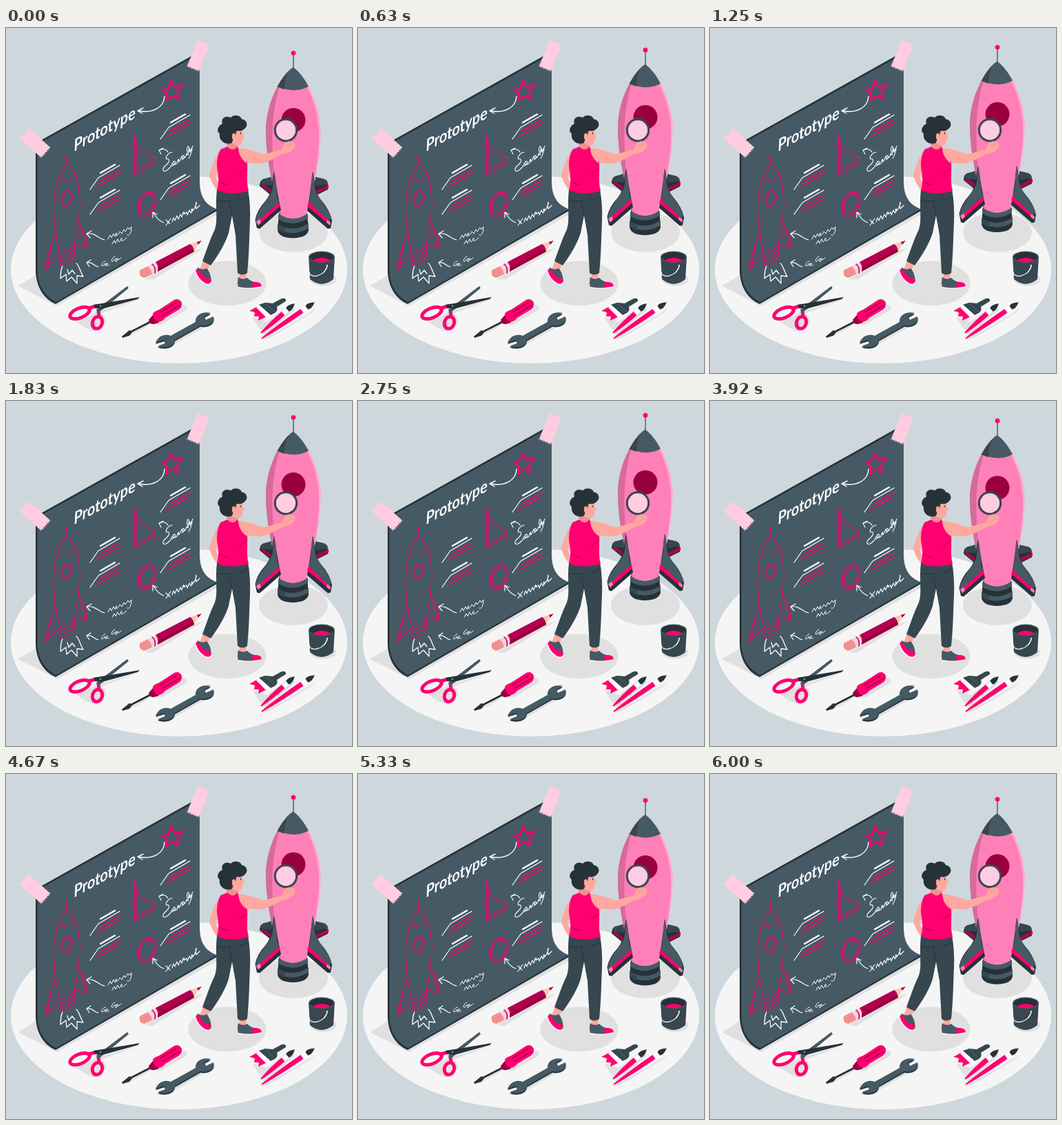
Recreate the animation shown at these times as an HTML page with a canvas. Size 502x500 px, loop 6.04 s.

```html
<!DOCTYPE html>
<html lang="en">
<head>
<meta charset="utf-8">
<title>Prototype</title>
<style>
html, body { margin: 0; width: 100%; height: 100%; overflow: hidden; background: #ced7dc; }
canvas { display: block; width: 502px; height: 500px; }
</style>
</head>
<body>
<canvas id="stage"></canvas>
<script>
const W = 502, H = 500, LOOP = 6040, PEAK = 2520, TRAVEL = 20.5;
const C = {
  sky: '#ced7dc', floor: '#f5f5f5', shade: '#e0e0e0', ink: '#263238', dark: '#37474f',
  slate: '#455a64', pink: '#ff0070', wine: '#99003f', crimson: '#b3004f', rose: '#ff80b8',
  blush: '#ffcce2', skin: '#ffa8a0', skinDark: '#f28f8f', white: '#fff'
};
const canvas = document.getElementById('stage');
const g = canvas.getContext('2d');
const dpr = window.devicePixelRatio || 1;
canvas.width = W * dpr;
canvas.height = H * dpr;

const paths = new Map();
function path(d) {
  if (!paths.has(d)) paths.set(d, new Path2D(d));
  return paths.get(d);
}
function fill(color, d) {
  g.fillStyle = color;
  g.fill(path(d));
}
function line(color, w, d, dash = []) {
  g.strokeStyle = color;
  g.lineWidth = w;
  g.setLineDash(dash);
  g.stroke(path(d));
}
function oval(color, x, y, rx, ry = rx, turn = 0, w = 0, dash = []) {
  g.beginPath();
  g.ellipse(x, y, rx, ry, turn, 0, Math.PI * 2);
  if (w) {
    g.strokeStyle = color;
    g.lineWidth = w;
    g.setLineDash(dash);
    g.stroke();
  } else {
    g.fillStyle = color;
    g.fill();
  }
}
function at(x, y, draw) {
  g.save();
  g.translate(x, y);
  draw();
  g.restore();
}

// Strip of tape with saw-tooth ends, centred on x, y
function tape(x, y, turn, len, wide) {
  at(x, y, () => {
    g.rotate(turn);
    g.beginPath();
    const n = 10;
    for (const side of [1, -1]) {
      for (let i = 0; i <= n; i++) {
        g.lineTo(side * (len / 2 - (i % 2) * 2), side * wide * (i / n - 0.5));
      }
    }
    g.closePath();
    g.fillStyle = C.blush;
    g.fill();
  });
}

function note(x, y) {
  at(x, y, () => {
    line(C.white, 1.2, 'M0 0L12 -17L43 -35');
    line(C.white, 2.4, 'M15 -24L36 -36');
    line(C.pink, 1.5, 'M14 -12L42 -28M10 -4L42 -22');
  });
}

function board() {
  fill(C.shade, 'M17 374L45 357L74 398L305 264L309 269L74 403Z');
  fill(C.ink, 'M43 167L280 34.5V222C280 244 288 256 306 263V265L72 400C53 392 43 372 43 350Z');
  fill(C.slate, 'M45.5 168.5L281 37V222C281 244 289 256 306 262.5L73 397C55 389 45.5 371 45.5 350Z');

  g.save();
  g.transform(0.8, -0.44, -0.06, 1, 98, 179.5);
  g.font = '700 25px Lato, sans-serif';
  g.fillStyle = C.white;
  g.fillText('Prototype', 0, 0);
  g.restore();

  line(C.pink, 2.6, 'M239 76L244 85L256 83L248 92L251 103L242 98L232 106L234 95L227 90L236 87Z');
  line(C.white, 1.4, 'M230 99C229 116 212 124 192 120M199 116L191 120L198 124');
  note(122, 234);
  note(122, 270);
  note(224, 161);
  note(224, 249);
  sketch();
  script();
  tape(42, 166.5, 0.73, 44, 20);
  tape(279, 40, -1.18, 43, 18.5);
}

function sketch() {
  const p = C.pink;
  // small rocket
  oval(p, 87.5, 185.5, 2);
  line(p, 1.1, 'M88 187V197');
  line(p, 1.2, 'M88 197C75 209 69 237 69 262C70 289 74 310 78 326M88 197C102 205 107 230 107 254C106 279 103 298 99 314', [7, 1.2]);
  line(p, 1.1, 'M77 221Q91 224 102 211');
  oval(p, 88, 247, 7.5, 11.5, 0.3, 1.4, [5, 1]);
  oval(p, 88, 247, 5, 8.5, 0.3, 0.9);
  line(p, 1.2, 'M71 296C67 316 60 320 58 350L76 329M65 318L60 347M106 280C108 292 119 295 117 318L100 313M109 290L115 315', [8, 1]);
  line(p, 1.1, 'M77 326Q90 327 100 313M77 331Q91 331 100 319M77 337Q92 337 100 325M79 343Q93 342 99 330M77 326L79 344M100 313L99 331');
  line(C.white, 1.3, 'M82 345C78 353 80 358 79 363L87 357L88 367L95 361L103 370L103 359L112 360C107 353 107 345 102 341M89 350L91 357L96 351L100 356');
  // wing profile
  line(p, 1.3, 'M186.5 155V212M187 156C188 175 197 181 215 187M216 187V196L186 213');
  line(p, 0.9, 'M189.5 164V206M189 205L214 192M188 209L214 195', [3, 1.8]);
  // toothed ring
  oval(p, 204.5, 255, 11.5, 18, 0.4, 2.2, [3, 1.6]);
  oval(p, 204.5, 255, 9, 15, 0.4, 1);
}

function script() {
  const w = C.white;
  line(w, 1.1, 'M235 180C231 174 227 175 223 177M228 174L222 177L225 183');
  line(w, 1.1, 'M241 180C237 180 230 187 233 190C238 188 238 194 232 199C226 204 227 209 232 207C238 204 241 198 241 196M241 200C246 197 247 193 244 193C241 196 242 201 248 196L250 190L251 194L255 186M255 191C259 189 260 184 257 185C254 188 256 192 261 186L262 182L264 184C266 176 266 168 263 173C262 180 264 184 267 175V180L271 171M270 175C269 182 267 186 265 189');
  line(w, 1.2, 'M229 282C222 280 218 275 214 268M213 275L213 267L219 270');
  line(w, 1.1, 'M232 278L238 284M239 276L232 286M241 281L243 275L245 279L248 272L250 277L253 270L255 274C257 266 259 264 258 270L262 267L263 271L266 264L268 268C272 264 271 260 269 263C268 268 273 265 276 255C277 249 274 254 276 262L281 257');
  line(w, 1.2, 'M143 307C135 306 129 296 118 298M124 294L117 298L122 304');
  line(w, 1, 'M148 306L151 300L153 304L156 298L158 302C162 299 161 295 159 298C158 303 163 301 165 295L168 298L171 292L173 295L177 289L179 292L182 288C182 295 180 302 176 300');
  line(w, 1, 'M154 313L157 308L159 312L162 306L164 310C169 307 169 303 167 305C165 310 171 309 175 304');
  line(w, 1.2, 'M134 346C128 346 127 339 118 340M123 336L117 340L121 346');
  line(w, 1, 'M144 338C139 339 137 346 140 345L144 341V345C148 342 148 339 146 341C145 345 148 345 150 343M158 331C153 333 152 340 155 338L159 334V339C163 336 163 332 161 334C160 338 164 336 167 333');
}

// Slim brush from its pointed end, drawn along the x axis
function brush(x, y, turn, len) {
  at(x, y, () => {
    g.rotate(turn);
    const n = len - 22;
    fill(C.pink, `M0 -1Q${n / 2} -4 ${n} -3.5V3.5Q${n / 2} 4 0 1Z`);
    fill(C.white, `M${n} -3.5L${n + 8} -3V3L${n} 3.5Z`);
    fill(C.ink, `M${n + 8} -3Q${n + 13} -6 ${len} 0Q${n + 13} 6 ${n + 8} 3Z`);
  });
}

function tools() {
  // pencil
  fill(C.shade, 'M201 364L279 321L287 319L213 365Z');
  fill('#f28f8f', 'M194 351L206 345L214 356L201 362Q192 361 194 351Z');
  fill(C.blush, 'M206 345L218 339Q224 346 221 352L211 358Q213 351 206 345Z');
  line(C.crimson, 1.6, 'M212 342Q218 347 216 355');
  fill(C.crimson, 'M217 339L267 313L273 315L273 324L220 353Q222 346 217 339Z');
  fill(C.wine, 'M221 347L273 319V324L220 353Z');
  fill('#ffc4b5', 'M267 313L281 309L273 324Q272 316 267 313Z');
  fill(C.wine, 'M277 310.3L284 308L279 314Z');

  // scissors
  fill(C.shade, 'M93 421Q108 427 132 411L192 394L138 414Q151 421 140 434L126 440Z');
  oval(C.pink, 107, 413, 15, 7, -0.38, 5);
  line(C.pink, 5, 'M120 406L131 403');
  oval(C.pink, 132.5, 427, 7, 9, 0.3, 5);
  line(C.pink, 5, 'M135 417L134 410');
  fill(C.slate, 'M131 408L176 374L178 377L140 408L134 413Z');
  fill(C.ink, 'M127 401L140 399L194 390L191 393L140 407L129 406Z');
  oval('#90a4ae', 137, 403, 1.2);

  // screwdriver
  fill(C.shade, 'M174 450L211 429L225 430L261 409Q266 401 256 401L216 419Z');
  line(C.ink, 3, 'M180 441L211 425');
  fill(C.ink, 'M168 447L179 438L184 440L179 446L169 449Z');
  fill(C.wine, 'M207 423L214 415L222 427L215 429Q208 430 207 423Z');
  fill(C.pink, 'M213 415C214 410 220 410 224 407L244 394Q251 391 255 398Q256 404 251 408L231 420Q229 424 222 426Q213 424 213 415Z');
  line(C.wine, 1.3, 'M224 412L247 398M226 417L252 402');

  // wrench
  fill(C.shade, 'M223 466L247 457L285 435L302 428L303 421L283 429L240 453Z');
  const wrench = 'M217 456C222 445 231 443 239 446L275 426C274 416 285 410 297 413L288 418L290 423L301 418C304 427 294 433 282 431L245 452C245 462 230 465 220 461L231 457L230 452Z';
  at(0, 2, () => fill(C.ink, wrench));
  fill(C.slate, wrench);

  // brushes
  fill(C.shade, 'M357 419L379 426L410 402L419 408L378 443L374 450L412 430L449 407L443 413L399 440L378 451Z');
  fill(C.pink, 'M353 410L364 404L379 418L366 424L367 418L360 418L361 412Z');
  fill(C.white, 'M363 405L368 401L384 415L377 419Z');
  fill(C.dark, 'M367 401L376 398L387 399L400 392Q407 391 406 396L393 404Q395 410 390 413L384 416Z');
  line(C.slate, 1.3, 'M376 399L390 412');
  brush(370, 442, -0.72, 65);
  brush(371, 450, -0.6, 93);

  // bucket
  oval(C.shade, 460, 364, 19, 10);
  fill(C.dark, 'M439 331L441 364Q458 378 475 364L477 331Z');
  oval(C.slate, 458, 332, 19, 8.5);
  oval(C.ink, 458, 332, 17.3, 7.2);
  fill(C.pink, 'M445 337Q458 329 471 337Q458 342 445 337Z');
  line(C.white, 1.3, 'M440 354C441 364 463 360 466 345');
  oval(C.white, 466, 344, 1.1);
}

function rocket() {
  // rear fins
  fill(C.ink, 'M389 215L373 219Q368 222 368 229L385 243Z');
  fill(C.dark, 'M369 222L386 215V228L371 227Z');
  fill(C.crimson, 'M369 228L374 227L387 237V242Z');
  fill(C.ink, 'M445 215L462 219Q468 223 467 234L447 244Z');
  fill(C.dark, 'M449 216L462 219Q467 221 467 226L449 229Z');
  fill(C.crimson, 'M447 237L468 227V232L447 242Z');

  // engine
  fill(C.ink, 'M396 268L394 293Q396 304 416 304.5Q437 304 439 293L437 268Z');
  fill(C.slate, 'M395 271V277Q416 290 438 276V270Z');
  fill(C.slate, 'M394 284Q416 298 439 283V290Q416 304 394 291Z');
  fill(C.dark, 'M394 284Q399 288 405 290V297Q398 295 394 291Z');

  // hull
  const hull = 'M416.5 57C403 65 379 101 377 145C376 188 388 230 397 270Q416 283 436 270C447 230 457 190 456.5 145C454 101 430 65 416.5 57Z';
  g.save();
  g.clip(path(hull));
  fill(C.rose, hull);
  fill('#d66b9b', 'M400 75C387 112 385 151 387 180C388 218 394 248 401 280H360V75Z');
  fill('#ffacd1', 'M436 84C451 111 455 140 454 164C452 207 443 244 434 277H465V84Z');
  fill(C.slate, 'M390 50H442V83Q418 98 390 82Z');
  fill(C.dark, 'M390 50H417C408 62 404 76 404 89L390 84Z');
  g.restore();
  oval(C.wine, 417, 133.5, 17.5);
  line(C.slate, 1.4, 'M417 58V39');
  oval(C.pink, 417, 36.3, 3.4);

  // front fins
  fill(C.ink, 'M389 208C385 222 388 236 377 250Q364 264 361.5 278L364 290L368 291L399 264Q394 242 389 208Z');
  fill(C.slate, 'M389 208C394 228 391 241 396 253L365 283Q361 281 363 276C367 259 386 245 387 230Z');
  fill(C.pink, 'M364 281L396 253L398 258L366 286Z');
  fill(C.rose, 'M363 281L368 277L370 282L366 286Z');
  fill(C.ink, 'M445 208C449 222 446 235 457 249Q470 264 473 279L471 290L467 291L437 265Q441 243 445 208Z');
  fill(C.slate, 'M445 208C441 230 444 241 439 252L469 282L472 275C467 259 449 245 448 229Z');
  fill(C.pink, 'M439 252L470 281L470 286L437 258Z');
  fill(C.rose, 'M466 278L471 282L470 286L465 282Z');
}

function person() {
  // far arm
  fill(C.skin, 'M310 179C303 187 298 202 295 213Q296 221 307 237L312 232Q306 222 304 214L313 200Z');
  // legs and shoes
  fill(C.skin, 'M286 337L296 341L292 353L281 350ZM338 350L349 350L348 365L339 364Z');
  fill(C.slate, 'M278 347Q285 352 291 348Q297 354 298 367Q294 373 288 370Q279 363 276 355Z');
  fill(C.pink, 'M276 349L283 354Q286 362 296 363Q298 367 296 371Q291 372 287 369Q279 362 275 354Z');
  line(C.white, 1.3, 'M275 353Q278 364 288 370Q294 373 297 370');
  fill(C.slate, 'M337 361Q343 366 350 362Q356 369 367 369Q372 373 368 376Q352 380 337 376Q335 369 337 361Z');
  fill(C.pink, 'M359 368Q370 368 371 373L368 376L358 377Q356 372 359 368Z');
  line(C.white, 1.3, 'M337 376Q352 379 369 375.5');
  fill(C.dark, 'M306 235C303 260 308 278 303 292C296 306 291 322 285 338L297 344C310 327 319 310 323 297L328 272L333 300L336 355Q343 360 350 355C353 326 353 300 354 281Q355 256 351 233Z');
  line(C.ink, 1.1, 'M328 272L324 253M308 249Q316 253 326 250M349 244Q343 249 337 249');

  // neck and face
  fill(C.skinDark, 'M321 160H337V174Q329 181 320 175Z');
  fill(C.skin, 'M324 145L341 139Q344 147 343 151L346 158L343 160Q344 168 338 170Q330 170 326 164Z');
  line(C.ink, 1, 'M339 149L342 148');
  oval(C.ink, 340.5, 152.5, 0.8, 1.2);
  // hair
  fill(C.ink, 'M327 167C317 170 308 162 310 153C304 149 309 140 314 139C311 130 320 126 326 130C330 125 340 126 342 132C350 133 352 142 346 146C343 150 336 148 334 150L333 157Q328 154 328 160Q331 162 327 167Z');
  oval(C.skin, 330.5, 156, 2.5, 3.5);

  // top
  fill(C.pink, 'M311 176L321 172Q330 180 335 172L338 175Q340 188 350 195C351 209 348 220 352 236Q326 244 306 235C311 218 306 209 306 198Q306 186 311 176Z');
  line(C.wine, 0.9, 'M348 204Q340 209 338 209M309 222Q316 227 322 227');

  // lens
  line(C.dark, 4, 'M409 164L411 171');
  oval(C.blush, 406, 148, 15.5);
  oval(C.dark, 406, 148, 15.7, 15.7, 0, 3);

  // near arm and hand
  fill(C.skin, 'M337 174C349 174 363 180 374 183L401 176C402 169 405 165 411 164L418 166Q421 171 417 175Q411 182 402 182C391 188 381 194 372 196C363 197 353 195 348 195Q338 188 337 174Z');
  line(C.skinDark, 0.9, 'M407 169L416 168M408 173L417 171');
}

function draw(t) {
  const gap = Math.abs(t - PEAK);
  const drop = Math.min(gap, LOOP - gap) / (LOOP / 2) * TRAVEL;
  const rest = PEAK / (LOOP / 2) * TRAVEL;
  g.setTransform(dpr, 0, 0, dpr, 0, 0);
  g.lineCap = g.lineJoin = 'round';
  g.fillStyle = C.sky;
  g.fillRect(0, 0, W, H);
  oval(C.floor, 251, 350, 244, 136);
  board();
  oval(C.shade, 417, 296, 50, 29);
  oval(C.shade, 321, 370, 56.5, 32.5);
  tools();
  at(0, drop - rest, rocket);
  person();
}

const start = performance.now();
function tick() {
  draw((performance.now() - start) % LOOP);
  requestAnimationFrame(tick);
}
tick();
</script>
</body>
</html>
```
